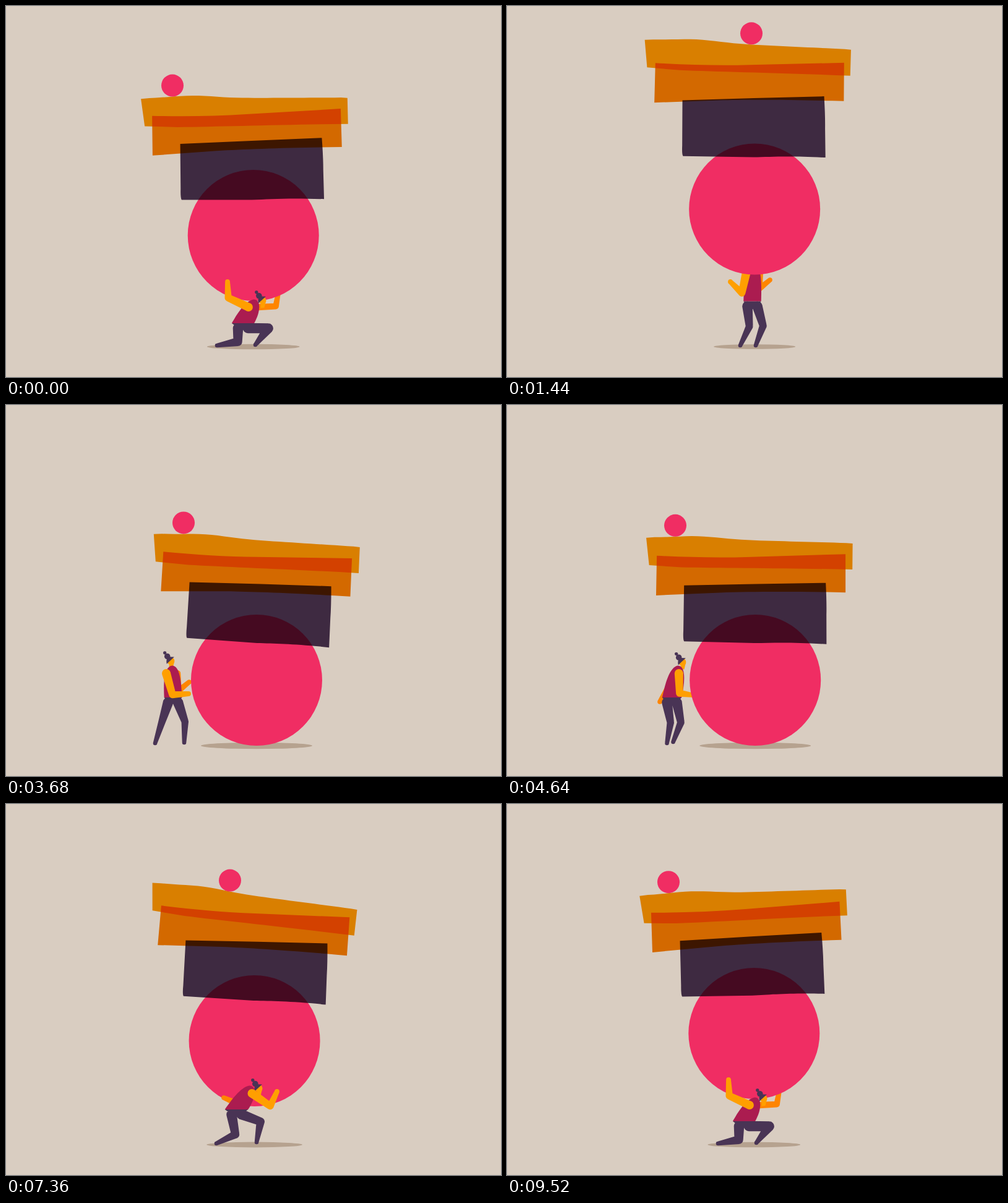
An HTML page that plays this animation: 800 px wide and 600 px high, repeating every 9.6 s.

```html
<!DOCTYPE html>
<html lang="en">
<head>
<meta charset="utf-8">
<title>Balancing act</title>
<style>
html, body { margin: 0; width: 100%; height: 100%; overflow: hidden; background: #d9cdc1; }
svg { display: block; width: 100vw; height: 100vh; }
.block { mix-blend-mode: multiply; }
</style>
</head>
<body>
<svg viewBox="0 0 800 600">
  <rect width="800" height="600" fill="#d9cdc1"/>
  <ellipse id="shadow" cy="551" fill="#b6a28f"/>
  <g id="under"></g>
  <circle id="globe" r="106" fill="#f02d63"/>
  <path id="low" class="block" fill="#493455" d="M-115.4-42.9 L0-47.5 113.5-51.6 Q115.7-20 115.6 0 L116.7 47.4 C60 45 30 47 0 48 L-113.5 47.5 Q-115.5 45-115 30Z"/>
  <path id="mid" class="block" fill="#f88200" d="M-152-31.5 C-100-28.5-50-27 0-28.3 L153-31.5 152.5 30.5 C60 28 0 28-50 29 L-153.7 32.6Z"/>
  <path id="high" class="block" fill="#ff9e00"/>
  <circle id="ball" r="18" fill="#f02d63"/>
  <g id="over"></g>
  <path id="far" fill="#ff8500"/>
  <g id="body">
    <path id="legs" fill="#493455"/>
    <g id="head">
      <path d="M-2-3 L5-4 5 3 2 12-4 12Z" fill="#ff9f00"/>
      <circle r="6" fill="#ff9f00"/>
      <path d="M-7 4 Q-8-4-3-7 L6-6Z" fill="#493455"/>
      <circle cx="-5" cy="-8" r="4.8" fill="#493455"/>
      <circle cx="-8.5" cy="-14" r="2.7" fill="#493455"/>
    </g>
    <path id="vest" fill="#ab1c50"/>
  </g>
  <path id="near" fill="#ff9f00"/>
</svg>
<script>
const LOOP = 9600, STEP = 80, GROUND = 445;
const el = {};
document.querySelectorAll('[id]').forEach(e => el[e.id] = e);
const set = (id, attrs) => { for (const k in attrs) el[id].setAttribute(k, attrs[k]); };

// Smooth interpolation without overshoot; keys are [time, ...values]
const slope = (a, b) => a * b <= 0 ? 0 : 2 * a * b / (a + b);
function sample(keys, t) {
  let i = 0;
  while (i < keys.length - 2 && keys[i + 1][0] <= t) i++;
  const p = keys[i], q = keys[i + 1], prev = keys[i - 1], next = keys[i + 2];
  const h = q[0] - p[0], u = (t - p[0]) / h, w = u * u * (3 - 2 * u);
  return p.slice(1).map((v, n) => {
    const j = n + 1, d = (q[j] - v) / h;
    const m0 = prev ? slope((v - prev[j]) / (p[0] - prev[0]), d) : 0;
    const m1 = next ? slope(d, (next[j] - q[j]) / (next[0] - q[0])) : 0;
    return v + (q[j] - v) * w + h * u * (1 - u) * ((1 - u) * m0 - u * m1);
  });
}

// Height of the globe, sideways sway, bounce gap in the stack, place of the ball
const height = [[0, 371], [720, 370], [1040, 344], [1440, 328.5], [1520, 331], [1680, 362], [1800, 422],
  [1860, GROUND], [6480, GROUND], [6880, 416], [7120, 390], [7360, 383], [8320, 381], [8720, 331],
  [8880, 322], [9040, 330], [9360, 371], [LOOP, 371]];
const sway = [[0, -1.8], [720, 12], [1080, 19], [1440, 1], [1680, -23], [2080, -5], [2400, 6], [2800, -4],
  [3200, 0], [3720, 12], [4200, -8], [4600, 3], [5000, -1], [5760, 0], [6480, 0], [7120, 18],
  [7360, 10.5], [7840, -8], [8320, 15], [8720, 8], [9360, -11], [9520, -4.7], [LOOP, -1.8]];
const bounce = [[0, -4], [720, -2], [1440, 40], [1680, 48], [1840, 40], [2000, 0], [6640, 0], [7360, 8],
  [8480, -7], [8720, -7], [9200, 20], [9520, 2], [LOOP, -4]];
const roll = [[0, 269], [720, 298], [1440, 395], [1840, 335], [2400, 287], [3200, 274], [3680, 287],
  [4600, 272], [6480, 274], [7360, 362], [7840, 318], [8720, 377], [9520, 261], [LOOP, 269]];

// Upper surface of the top block, in its own coordinates
const rim = x => -22.2 - 4.2 * Math.exp(-(((x + 85) / 50) ** 2));
let edge = 'M-168.5-21.6';
for (let x = -155; x < 165; x += 10) edge += `L${x} ${rim(x)}`;
set('high', { d: edge + 'L165.2-21.6 166 20.4 C60 21-40 24-110 24.5 L-162.6 22.7Z' });

function drawLoad(t) {
  const [cy, k, e, bx] = [height, sway, bounce, roll].map(track => sample(track, t)[0]);
  // Nearness to the ground: there the globe rolls, in the air the blocks tilt more
  const g = Math.min(1, Math.max(0, (cy - 395) / 50));
  const cx = 400 + k * (.15 + .27 * g), rx = 90 - (GROUND - cy) * .205;
  set('shadow', { cx, rx, ry: rx * .057 });
  set('globe', { cx, cy });
  const put = (id, x, y, a) => set(id, { transform: `translate(${x} ${y}) rotate(${a})` });
  const hx = cx - 11.25 + k, hy = cy - 204 - e, tilt = .95 + k * (.6 - .37 * g) + .03 * e;
  put('low', cx - 2 + k * (.33 + .17 * g), cy - 108 - .6 * e, .3 + .3 * k);
  put('mid', cx - 9.1 + .78 * k, cy - 171 - .85 * e, -1.3 + k * (.45 - .17 * g) + .02 * e);
  put('high', hx, hy, tilt);
  const a = tilt * Math.PI / 180, x = bx - hx;
  set('ball', { cx: bx, cy: hy + x * Math.tan(a) + (rim(x) - 18) / Math.cos(a) });
}

// Pose: waist, shoulders, near hand, far hand, two feet, then twist and elbow bends
const squat = [383,513, 400,483, 358,446, 440,464, 341,549, 403,548, -.9,-1,1];
const stand = [396.5,477.5, 398,425, 361,446, 425,443, 377,549, 402,549, -1.2,-1,1];
const push = [270,473, 268,430, 295,467, 296,448, 241,547, 288,546, -1,1,1];
const walk = [334.5,473, 344,430, 367,469, 315,480, 328,547, 339,545, .2,.7,1];
const lift = [372.5,494, 393,464, 438,465, 352,475, 340,549, 405,547, .5,1,-.6];
const heave = [395.5,496, 402,459, 419,418, 386,420, 341,549, 414,549, .6,.5,0];

const shift = (p, dx, dy = 0) => p.map((v, i) => i > 11 ? v : v + (i % 2 ? dy : dx));
const sink = (p, dy) => p.map((v, i) => i < 8 && i % 2 ? v + dy : v);
const pace = (dx, spread) => {
  const p = shift(walk, dx);
  p[8] = p[0] - 3 - spread;
  p[10] = p[0] - 3 + spread;
  return p;
};

const poses = [
  [0, squat], [720, squat], [1280, sink(stand, -3)], [1440, stand], [1640, sink(stand, 14)],
  [1840, shift(stand, 0, -10)], [2240, shift(walk, 10, -7)], [2560, pace(-35, 23)], [2880, pace(-68, 5)],
  [3200, shift(push, -6)], [3680, push], [3760, push], [4200, shift(push, -8)],
  [4640, pace(-68, 5)], [5080, pace(-66, 5)], [5440, pace(-32, 23)], [5760, walk],
  [6040, pace(20, -23)], [6280, pace(34, 5)], [6640, sink(lift, 14)], [7280, lift], [7360, lift],
  [8240, sink(lift, 3)], [8480, lift], [8720, heave], [8880, sink(heave, -4)], [9040, heave],
  [9280, squat], [LOOP, squat]
].map(([t, p]) => [t, ...p]);

const dist = (a, b) => Math.hypot(a[0] - b[0], a[1] - b[1]);
// Middle joint of a two-part limb; bend is signed and 1 at full depth
function joint(a, c, l1, l2, bend) {
  const d = dist(a, c) || 1, ux = (c[0] - a[0]) / d, uy = (c[1] - a[1]) / d;
  const along = d < l1 + l2 ? (l1 * l1 - l2 * l2 + d * d) / (2 * d) : d * l1 / (l1 + l2);
  const h = bend * Math.sqrt(Math.max(0, d < l1 + l2 ? l1 * l1 - along * along : 0));
  return [a[0] + ux * along - uy * h, a[1] + uy * along + ux * h];
}
const disc = ([x, y], r) => `M${x + r} ${y}a${r} ${r} 0 0 0 ${-2 * r} 0a${r} ${r} 0 0 0 ${2 * r} 0Z`;
function taper(a, b, ra, rb) {
  const l = dist(a, b) || 1, nx = (a[1] - b[1]) / l, ny = (b[0] - a[0]) / l;
  const at = (p, r) => `${p[0] + nx * r} ${p[1] + ny * r}`;
  return `M${at(a, ra)}L${at(b, rb)} ${at(b, -rb)} ${at(a, -ra)}Z`;
}
const limb = (a, b, c, ra, rb, rc) =>
  disc(a, ra) + disc(b, rb) + disc(c, rc) + taper(a, b, ra, rb) + taper(b, c, rb, rc);
function leg(hip, foot) {
  const knee = joint(hip, foot, 33, 34, -1);
  knee[1] = Math.min(knee[1], 543);
  return limb(hip, knee, foot, 8.3, 5.7 + 4 * Math.max(0, 1 - dist(hip, foot) / 67), 3.3);
}

function drawPerson(t) {
  const p = sample(poses, t), [twist, nearBend, farBend] = p.slice(12);
  const [waist, s, hand, farHand, footA, footB] = [0, 2, 4, 6, 8, 10].map(i => [p[i], p[i + 1]]);
  const from = ([x, y], dx, dy) => [x + dx, y + dy];
  const ux = s[0] - waist[0], uy = s[1] - waist[1], bow = Math.atan2(ux, -uy);
  const half = 14 + 8 * Math.abs(bow);
  const wl = from(waist, -half, 0), wr = from(waist, half, 0);
  const hipA = from(waist, -8, 8), hipB = from(waist, 8, 8);

  set('vest', { d: `M${wl}C${from(wl, ux * .45, uy * .45)} ${from(s, -14, -6)} ${from(s, 0, -8.5)}`
    + `C${from(s, 13, -9)} ${from(wr, ux * .6, uy * .6)} ${wr}Z` });
  set('legs', { d: leg(hipA, footA) + leg(hipB, footB) + `M${wl}L${hipA} ${hipB} ${wr}Z` });
  const nearTop = from(s, 9 * twist, 4), farTop = from(s, -9 * twist, 4);
  set('near', { d: limb(nearTop, joint(nearTop, hand, 36, 26, nearBend), hand, 7, 5.7, 3.9) });
  set('far', { d: limb(farTop, joint(farTop, farHand, 28, 22, farBend), farHand, 5.2, 4.8, 3.8) });
  const nod = 2.2 * bow;
  set('head', { transform: `translate(${from(s, 16 * Math.sin(nod), -16 * Math.cos(nod))}) rotate(-5)` });

  const early = t < 1040, late = t >= 5040;
  const place = (id, front) => (front ? el.over : el.under).appendChild(el[id]);
  place('far', late && t < 8400);
  place('body', early || late && (t < 8560 || t > 9160));
  place('near', early || late);
}

const start = performance.now();
function frame() {
  const t = Math.floor((performance.now() - start) % LOOP / STEP) * STEP;
  drawLoad(t);
  drawPerson(t);
  requestAnimationFrame(frame);
}
frame();
</script>
</body>
</html>
```
